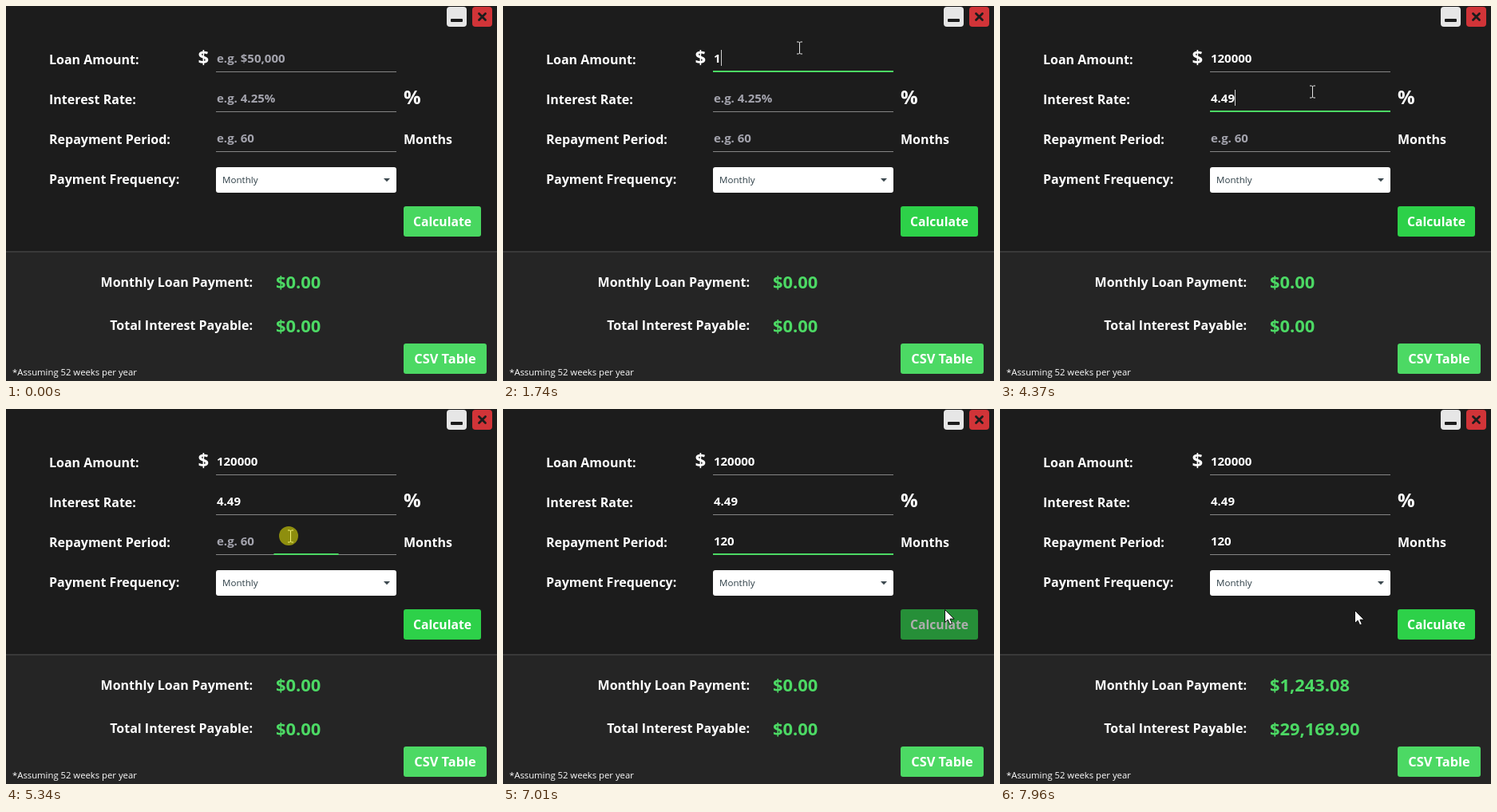
An HTML page that plays this animation: 615 px wide and 470 px high, repeating every 7990 ms.

```html
<!DOCTYPE html>
<html lang="en">
<head>
<meta charset="utf-8">
<title>Loan calculator</title>
<style>
html, body { margin: 0; width: 100%; height: 100%; overflow: hidden; background: #1c1c1c; }
svg { display: block; width: 615px; height: 470px; }
text { font: 700 16px "Open Sans", "Noto Sans", sans-serif; fill: #fff; white-space: pre; }
.end { text-anchor: end; }
.sign { font-size: 24px; }
.field { font-size: 15px; }
.field.empty { fill: #a4a4ae; }
.small { font-size: 11.3px; font-weight: 400; }
.option { font-size: 11.6px; font-weight: 400; fill: #2d3e46; }
.result { font-size: 21.9px; fill: #4cd964; }
</style>
</head>
<body>
<svg viewBox="0 0 615 470">
  <rect width="615" height="470" fill="#1c1c1c"/>
  <rect y="308" width="615" height="162" fill="#252525"/>
  <rect y="307" width="615" height="2" fill="#393939"/>

  <rect x="552" y="1" width="25" height="25" rx="4" fill="#e6e6e6"/>
  <rect x="557" y="16" width="15" height="4" rx="1" fill="#1c1c1c"/>
  <rect x="584" y="1" width="25" height="25" rx="4" fill="#d13438"/>
  <path d="M592.5 9.5l8 8m0-8l-8 8" stroke="#1c1c1c" stroke-width="2.8" stroke-linecap="round"/>

  <text x="54" y="73">Loan Amount:</text>
  <text x="54" y="123">Interest Rate:</text>
  <text x="54" y="173">Repayment Period:</text>
  <text x="54" y="223">Payment Frequency:</text>
  <text x="240.5" y="73" class="sign">$</text>
  <text x="498" y="123" class="sign">%</text>
  <text x="498" y="173">Months</text>
  <g id="fields"></g>

  <rect x="263" y="202" width="226" height="32" rx="3" fill="#fff"/>
  <text x="271" y="222" class="option">Monthly</text>
  <path d="M473 216h8l-4 4.3z" fill="#3b484e"/>

  <g id="calc">
    <rect id="calcFill" x="498" y="251" width="97" height="38" rx="3"/>
    <text x="546.5" y="276" text-anchor="middle" style="font-size:15.7px">Calculate</text>
  </g>
  <rect x="498" y="423" width="104" height="38" rx="3" fill="#4cd964"/>
  <text x="550" y="448" text-anchor="middle" style="font-size:16.4px">CSV Table</text>

  <text x="309" y="352" class="end">Monthly Loan Payment:</text>
  <text x="309" y="406" class="end">Total Interest Payable:</text>
  <text x="338" y="354" class="result" id="payment"></text>
  <text x="338" y="409" class="result" id="interest"></text>
  <text x="8" y="463" class="small">*Assuming 52 weeks per year</text>

  <rect id="caret" width="1" height="20" fill="#d0d0d0"/>
  <g id="pointer">
    <path id="arrow" d="M.5.5v16l3.7-3.4 2.5 5.7 2.7-1.2-2.5-5.5h5.2z" fill="#fff" stroke="#111"/>
    <path id="beam" d="M-3.5-7.5h2.5l1 1 1-1h2.5M0-6.5v13M-3.5 7.5h2.5l1-1 1 1h2.5" fill="none" stroke="#e4e4e4"/>
  </g>
  <circle id="press" r="12" fill="#ff0" fill-opacity=".5"/>
</svg>
<script>
const LOOP = 7990;
const RELEASE = 7400;
const $ = id => document.getElementById(id);
const clamp = v => Math.min(1, Math.max(0, v));
const ease = v => v * v * (3 - 2 * v);
const ramp = (t, from, to) => clamp((t - from) / (to - from));
const show = (el, on) => el.setAttribute('visibility', on ? 'visible' : 'hidden');

// keys: the time at which each character is typed
const fields = [
  { y: 71, hint: 'e.g. $50,000', value: '120000', click: 1030, blur: 2970, keys: [1740, 1870, 2020, 2200, 2350, 2500] },
  { y: 121, hint: 'e.g. 4.25%', value: '4.49', click: 2970, blur: 5250, keys: [3730, 3960, 4240, 4370] },
  { y: 171, hint: 'e.g. 60', value: '120', click: 5250, blur: 7300, keys: [5930, 6010, 6090] }
];

// time, x, y and an optional control point for a curved move
const path = [
  [490, 598, 109],
  [980, 373, 55],
  [1250, 371, 54],
  [1310, 371, 52],
  [2540, 371, 52],
  [2930, 391, 106],
  [4740, 391, 107],
  [5200, 356, 159],
  [6470, 356, 159],
  [6990, 553, 251, 440, 105],
  [7450, 553, 251],
  [7940, 444, 252]
];
const presses = [[1030, 1250], [2960, 3120], [5240, 5410], [7270, RELEASE]];

function add(tag, attrs) {
  const el = document.createElementNS('http://www.w3.org/2000/svg', tag);
  for (const name in attrs) el.setAttribute(name, attrs[name]);
  return $('fields').appendChild(el);
}

for (const f of fields) {
  add('rect', { x: 263, y: f.y + 11, width: 226, height: 1, fill: '#858585' });
  f.line = add('rect', { y: f.y + 10, height: 2, fill: '#4cd964' });
  f.text = add('text', { x: 264, y: f.y });
}

function pointerAt(t) {
  let i = path.findIndex(p => p[0] > t);
  if (i < 0) i = path.length - 1;
  if (i === 0) return path[0].slice(1, 3);
  const [t0, x0, y0] = path[i - 1];
  const [t1, x1, y1, cx = (x0 + x1) / 2, cy = (y0 + y1) / 2] = path[i];
  const u = ease(ramp(t, t0, t1));
  const bend = (a, c, b) => Math.round((1 - u) ** 2 * a + 2 * u * (1 - u) * c + u * u * b);
  return [bend(x0, cx, x1), bend(y0, cy, y1)];
}

function drawFields(t) {
  let caretOn = false;
  for (const f of fields) {
    const typed = f.keys.filter(k => k <= t).length;
    f.text.textContent = typed ? f.value.slice(0, typed) : f.hint;
    f.text.setAttribute('class', typed ? 'field' : 'field empty');

    const focused = t >= f.click && t < f.blur;
    const half = focused ? 113 * ramp(t, f.click + 30, f.click + 200) : 0;
    f.line.setAttribute('x', 376 - half);
    f.line.setAttribute('width', 2 * half);

    const since = t - (typed ? f.keys[typed - 1] : f.click + 110);
    if (focused && since >= 0 && since % 1000 < 500) {
      caretOn = true;
      const width = typed ? f.text.getComputedTextLength() : 0;
      $('caret').setAttribute('x', Math.round(264 + width));
      $('caret').setAttribute('y', f.y - 16);
    }
  }
  show($('caret'), caretOn);
}

function drawPointer(t) {
  const [x, y] = pointerAt(t);
  const visible = t >= path[0][0];
  const overField = x > 263 && x < 489 && fields.some(f => y > f.y - 21 && y < f.y + 12);
  $('pointer').setAttribute('transform', `translate(${x} ${y})`);
  show($('arrow'), visible && !overField);
  show($('beam'), visible && overField);
  $('beam').setAttribute('transform', 'translate(.5 .5)');
  $('press').setAttribute('cx', overField ? x - 2 : x);
  $('press').setAttribute('cy', y);
  show($('press'), presses.some(([a, b]) => t >= a && t < b));
}

function drawButton(t) {
  const fade = ramp(t, 30, 160);
  const mix = (a, b) => Math.round(a + (b - a) * fade);
  $('calcFill').setAttribute('fill', `rgb(${mix(72, 45)},${mix(215, 209)},${mix(96, 73)})`);
  const hover = ramp(t, 6850, 6990) - ramp(t, 7600, 7760);
  $('calc').setAttribute('opacity', 1 - 0.36 * hover);
}

function draw(t) {
  drawFields(t);
  drawPointer(t);
  drawButton(t);
  const done = t >= RELEASE;
  $('payment').textContent = done ? '$1,243.08' : '$0.00';
  $('interest').textContent = done ? '$29,169.90' : '$0.00';
}

const start = performance.now();
function tick() {
  draw((performance.now() - start) % LOOP);
  requestAnimationFrame(tick);
}
tick();
</script>
</body>
</html>
```
